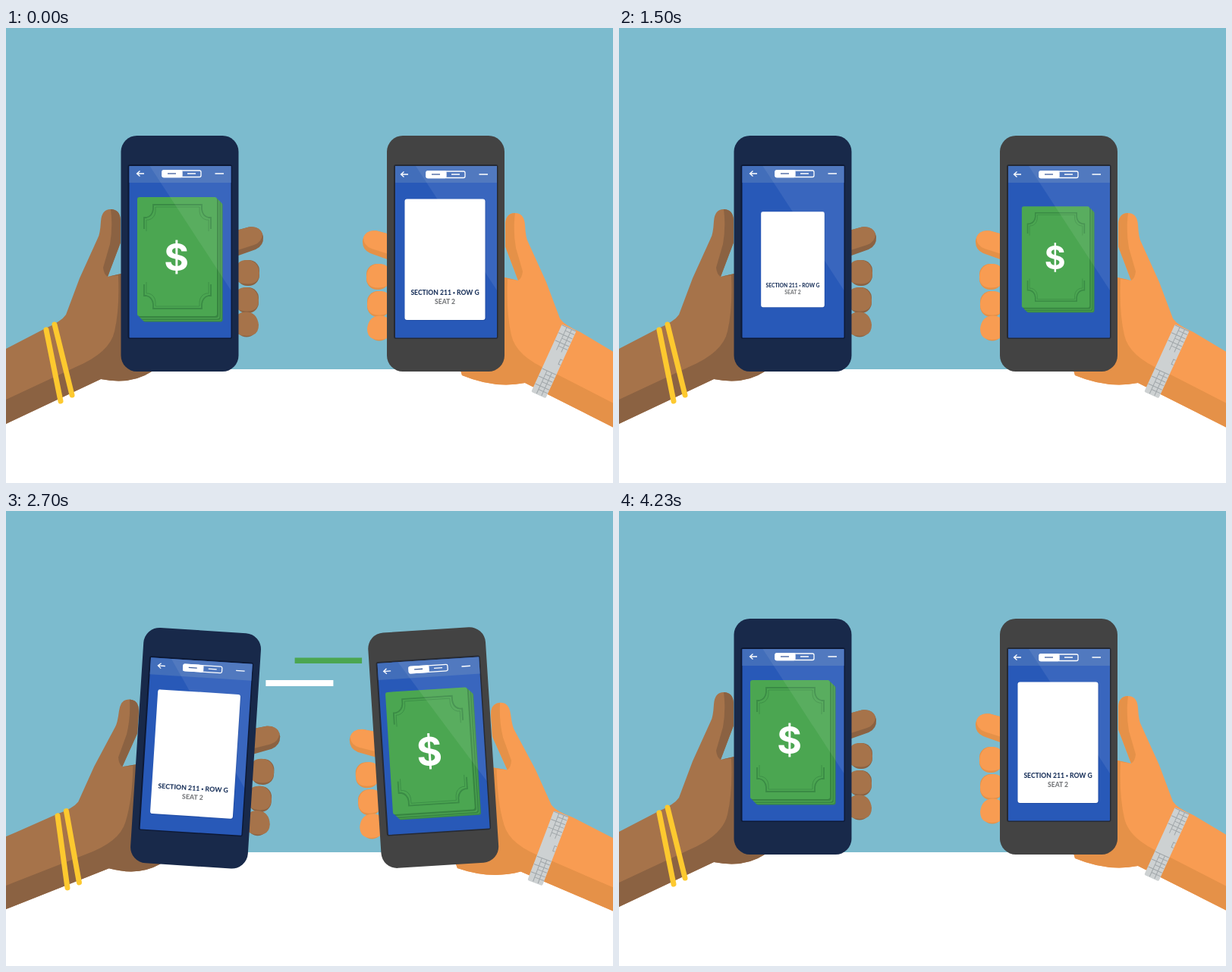
Recreate the animation shown at these times as an HTML page. Size 800 by 600 pixels, loop 4260 ms.

```html
<!DOCTYPE html>
<html lang="en">
<head>
<meta charset="utf-8">
<title>Ticket swap</title>
<style>
  html, body { margin: 0; width: 100%; height: 100%; overflow: hidden; background: #fff; }
  svg { display: block; width: 100vw; height: 100vh; }
  text { font-family: Lato, "Open Sans", sans-serif; font-weight: 800; text-anchor: middle; }
  .dollar { font-family: Inter, "Open Sans", sans-serif; font-weight: 700; }
</style>
</head>
<body>
<svg id="stage" viewBox="0 0 800 600"></svg>
<script>
const LOOP = 4260, HALF = LOOP / 2;
const GREEN = '#4ba651', WHITE = '#fff';
const CARD_Y = 305, CARD_SWELL = 1.05;

const clamp = v => Math.max(0, Math.min(1, v));
const lerp = (a, b, k) => a + (b - a) * k;
const span = (t, a, b) => clamp((t - a) / (b - a));
const easeInOut = power => k =>
  k < .5 ? Math.pow(2 * k, power) / 2 : 1 - Math.pow(2 - 2 * k, power) / 2;
const sine = k => (1 - Math.cos(Math.PI * k)) / 2;
const cubic = easeInOut(3), quart = easeInOut(4);

const line = (x1, y1, x2, y2) => `M${x1} ${y1}L${x2} ${y2}`;

// Drawn for the left side; the right side mirrors it.
// heel: where the palm meets the phone's lower edge; drop: how far the forearm sags.
function hand(skin, shade, heel, drop) {
  const fingers = [[319, 323, 15, 17], [318, 359, 15, 17], [317, 391, 14, 16.5]];
  const finger = ([x, y, rx, ry]) => `
    <rect x="${x - rx}" y="${y - ry}" width="${2 * rx}" height="${2 * ry}" rx="14" fill="${shade}"/>
    <path fill="${skin}" d="M${x - rx} ${y + 8}V${y - ry + 12}q0 -12 13 -12q15 0 17 17q0 10 -7 13
      q-10 4 -23 -2z"/>`;
  const palm = `L230 380L${heel} 453Q165 471 125 463L0 ${522 + drop}L-130 ${583 + drop}`;
  return `
    <path fill="${shade}" d="M296 269L320 262.500Q336 261 339 275Q340 287 329 292L298 303z"/>
    <path fill="${skin}" d="M296 269L320 262.500Q334 261 338 271Q338 282 327 286L296 296z"/>
    ${fingers.map(finger).join('')}
    <path fill="${skin}" d="M-130 ${490 + drop}L0 ${423 + drop}L52 396Q73 387 79 378L97 330L121 277
      Q124 272 125 255Q126 239 138 239Q150 239 151 253V283L134 328L156 323${palm}z"/>
    <path fill="${shade}" d="M138 239Q150 239 151 253V283L134 328Q129 325 128 316L137 285Q141 262 138 239z"/>
    <path fill="${shade}" d="M134 328L156 323${palm}V552L0 ${490 + drop}L92 447
      Q137 428 143 400Q150 370 148 326z"/>`;
}

const bracelets = `<path fill="none" stroke="#fdc92f" stroke-width="7" stroke-linecap="round"
  d="${line(53, 398, 72, 492)}${line(64, 391, 87, 484)}"/>`;

function watch() {
  let links = '';
  for (const y of [-48, -37, -26, 15, 26, 37]) {
    links += line(-10, y, 10, y) + line(-3, y, -3, y + 11) + line(4, y, 4, y + 11) + line(-3, y + 5, 10, y + 5);
  }
  return `<g transform="translate(722 439.500) rotate(24.500)">
    <rect x="-10.500" y="-49" width="21" height="98" rx="2" fill="#cdd1d2"/>
    <path d="${links}M10 -6h-3v7h3" stroke="#a0a6a9" fill="none"/>
  </g>`;
}

function phone(x, body, edge, uiX, uiY, side) {
  return `
    <rect x="${x}" y="142" width="155" height="311" rx="21" fill="${body}"/>
    <rect x="${x + 9}" y="180" width="137.500" height="230" rx="3" fill="${edge}"/>
    <rect x="${x + 11}" y="182" width="134" height="226.500" rx="1" fill="#2859b8"/>
    <rect x="${x + 11}" y="182" width="134" height="22" fill="#426eba"/>
    <g transform="translate(${uiX} ${uiY})" fill="none" stroke="#fff" stroke-width="1.300">
      <path d="M182 192H172.500M176.500 188.500L172.500 192L176.500 195.500M275.500 192H287M239 192H250"/>
      <rect x="206" y="188" width="51" height="8.500" rx="2"/>
      <rect x="206" y="188" width="26" height="8.500" rx="1.500" fill="#fff"/>
      <path d="M213 192H224" stroke="#2d4f94"/>
    </g>
    <g id="card${side}"></g>
    <path d="M${x + 38} 182H${x + 145}V346z" fill="#fff" opacity=".08"/>`;
}

function moneyCard() {
  const sheet = (d, fill) => `<rect x="${-56 + d}" y="${-82 + d}" width="105" height="157" rx="3" fill="${fill}"/>`;
  const corner = (l, t, r) => `M${l} ${t + 32}V${t + 17}h3q8 -2 9 -11v-6H${r - 12}v6q1 9 9 11h3V${t + 32}`;
  const bracket = `<path d="${corner(-47, -72, 41)}"/><path stroke-width=".8" d="${corner(-44, -69, 38)}"/>`;
  return sheet(7.5, '#3b8c45') + sheet(6, '#4aa050') + sheet(5, '#378541') + sheet(3.5, '#4aa050') +
    sheet(2, '#378541') + sheet(0, GREEN) +
    `<g fill="none" stroke="#3a8b45" stroke-width="1.800">${bracket}
      <g transform="translate(0 -7) scale(1 -1)">${bracket}</g></g>
    <text class="dollar" x="-4.500" y="15" font-size="50" fill="#fff">$</text>`;
}

function ticketCard() {
  return `<rect x="-53" y="-79" width="107" height="160" rx="3" fill="#173a85" opacity=".35"/>
    <rect x="-53" y="-79.500" width="106" height="159.500" rx="3" fill="#fff"/>
    <text y="47" font-size="8.600" fill="#20375f">SECTION 211 <tspan font-size="5" dy="-1">•</tspan><tspan
      dy="1"> ROW G</tspan></text>
    <text y="58.500" font-size="8.600" fill="#77797c">SEAT 2</text>`;
}

const stage = document.getElementById('stage');
stage.innerHTML = `
  <rect width="800" height="600" fill="#fff"/>
  <rect width="800" height="450" fill="#7cbbce"/>
  <g id="streaks"></g>
  <g id="arm0">${hand('#a6734a', '#8b6242', 192, 0)}${bracelets}
    ${phone(151.5, '#18294a', '#0d1935', 0, 0, 0)}</g>
  <g id="arm1"><g transform="translate(809 5) scale(-1 1)">${hand('#f89c52', '#e59148', 208, 4)}</g>${watch()}
    ${phone(502, '#434343', '#262a33', 348, 1, 1)}</g>
  <g id="sparks" fill="none" stroke-width="5.500" stroke-linecap="round"></g>`;

const byId = id => document.getElementById(id);
const arms = [byId('arm0'), byId('arm1')];
const cards = [byId('card0'), byId('card1')];
const streaks = byId('streaks'), sparks = byId('sparks');
const cardX = [229, 578.5];
const sparkX = [229, 584];
const faces = { money: moneyCard(), ticket: ticketCard() };
const shown = [];

// Wind up outward, throw inward, settle.
function swing(u) {
  if (u < 348) return -.15 * quart(span(u, 160, 348));
  if (u < 500) return lerp(-.15, .098, cubic(span(u, 348, 500)));
  return .098 * (1 - cubic(span(u, 500, 660)));
}

// Swell with the wind-up, shrink away, then pop back past full size.
function cardScale(u, peak) {
  if (u < 550) return lerp(1, CARD_SWELL, sine(span(u, 160, 450)));
  if (u < 1000) return CARD_SWELL * (1 - sine(span(u, 550, 780)));
  if (u < 1545) return peak * sine(span(u, 1430, 1545));
  return lerp(peak, 1, sine(span(u, 1545, 1700)));
}

function drawStreaks(u, rightColor, leftColor) {
  let out = '';
  for (let k = 0; k < 6; k++) {
    const run = (u - 570 - 140 * k) * .9;
    if (run < -125 || run > 165) continue;
    const y = 193.5 + 60 * (k % 2);
    out += `<rect x="${341.5 + run}" y="${y + 29.5}" width="89" height="8" fill="${rightColor}"/>
      <rect x="${381.5 - run}" y="${y}" width="88.500" height="7.500" fill="${leftColor}"/>`;
  }
  streaks.innerHTML = out;
}

function sparkPath(cx, u) {
  const grow = span(u, 1505, 1530), drift = 8 * span(u, 1530, 1860), fade = span(u, 1690, 1860);
  const ray = (x, y, dx, dy) => {
    const len = Math.hypot(dx, dy), ux = dx / len, uy = dy / len;
    const tip = len * grow + drift, tail = tip * fade;
    return line(cx + x + ux * tail, 303 + y + uy * tail, cx + x + ux * tip, 303 + y + uy * tip);
  };
  let d = '';
  for (const v of [-1, 1]) {
    d += ray(0, 94 * v, 0, 26 * v);
    for (const h of [-1, 1]) d += ray(54 * h, 74 * v, 16 * h, 23 * v) + ray(87 * h, 29 * v, 26 * h, 8.5 * v);
  }
  return d;
}

function render(time) {
  const t = time % LOOP, u = t % HALF;
  const moneyLeft = (t < HALF) === (u < 1000);
  const angle = swing(u);

  arms.forEach((arm, side) => {
    const dir = side ? -1 : 1;
    const pivotY = angle < 0 ? 760 : side ? 560 : 635;
    arm.setAttribute('transform', `rotate(${angle * dir * 180 / Math.PI} ${side * 800} ${pivotY})`);

    const kind = moneyLeft === (side === 0) ? 'money' : 'ticket';
    if (shown[side] !== kind) cards[side].innerHTML = faces[shown[side] = kind];
    const s = cardScale(u, kind === 'money' ? 1.25 : 1.16);
    cards[side].setAttribute('transform', `translate(${cardX[side]} ${CARD_Y}) scale(${s})`);
    cards[side].setAttribute('visibility', s > .005 ? 'visible' : 'hidden');
  });

  drawStreaks(u, t < HALF ? GREEN : WHITE, t < HALF ? WHITE : GREEN);

  sparks.innerHTML = u > 1505 && u < 1860
    ? sparkX.map((x, side) =>
        `<path d="${sparkPath(x, u)}" stroke="${moneyLeft === (side === 0) ? GREEN : WHITE}"/>`).join('')
    : '';
}

const start = performance.now();
function tick() {
  render(performance.now() - start);
  requestAnimationFrame(tick);
}
tick();
</script>
</body>
</html>
```
